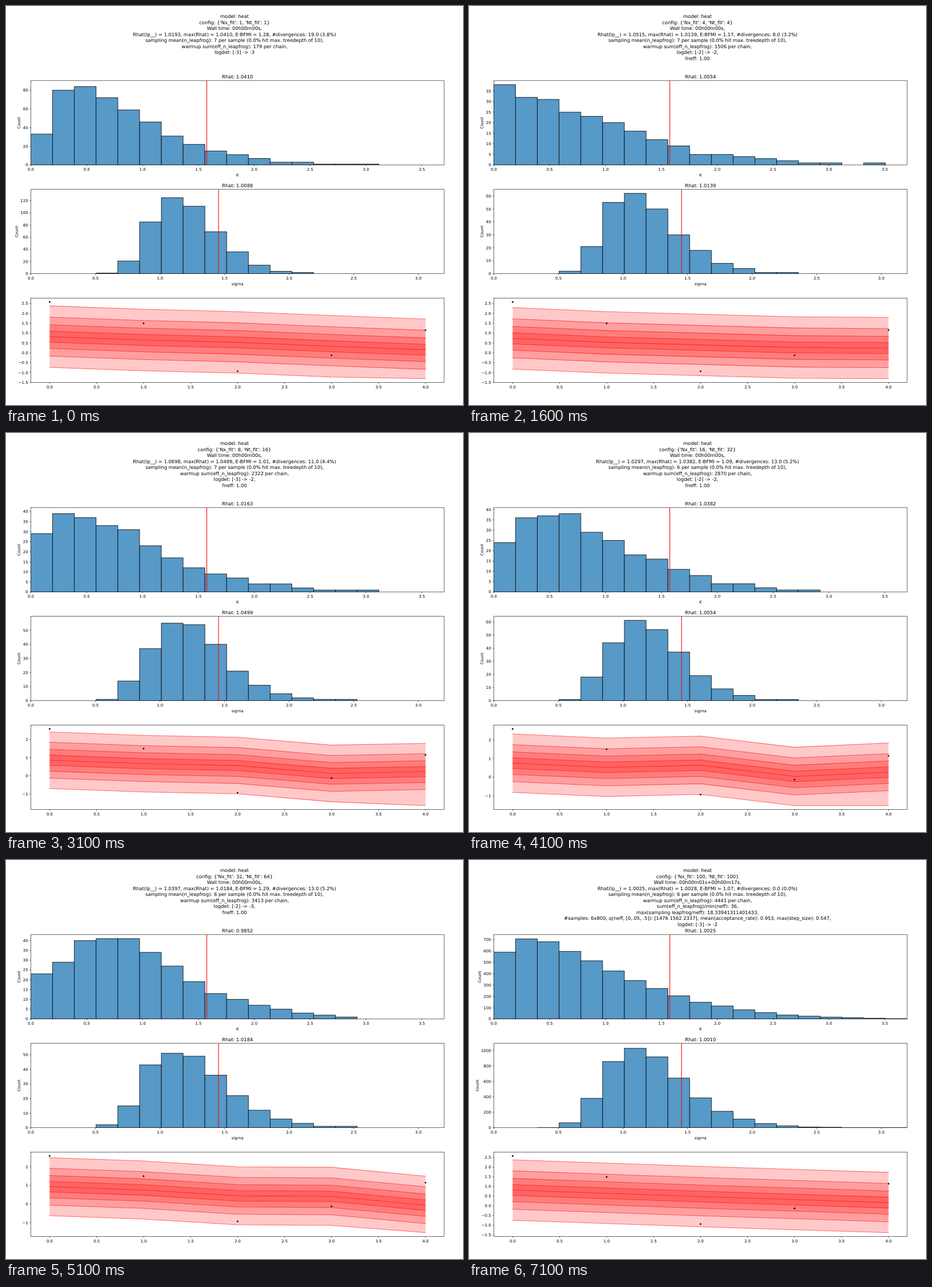
An HTML page with a canvas that plays this animation: 800x700 px, repeating every 7600 ms.

```html
<!DOCTYPE html>
<html lang="en">
<head>
<meta charset="utf-8">
<title>Posterior fit</title>
<style>
html, body { margin: 0; width: 100%; height: 100%; overflow: hidden; background: #fff; }
canvas { display: block; }
</style>
</head>
<body>
<canvas id="stage" width="800" height="700"></canvas>
<script>
const ctx = document.getElementById('stage').getContext('2d');
const LEFT = 43.5, RIGHT = 767, HEIGHT = 148, BINS = 19;
const TOP_K = 130.9, TOP_SIGMA = 321.7, TOP_FIT = 512.5;
const SMALL = 6.944, LARGE = 8.333;
const FIRST_MS = 100, STEP_MS = 500, LOOP_MS = 7600;
const LAST = 15, SHORT_RUN = 250;

const SIZES = [1, 2, 4, 8, 16, 32, 64, 100];
const OBSERVED = [2.58, 1.495, -0.935, -0.127, 1.145];
// Distance of the nested quantile curves from the median, widest first.
const QUANTILES = [1.56, 0.99, 0.6, 0.28];
// Lower end of the widest band in each step; it sets the axis.
const LOWEST = [-1.31, -1.56, -1.56, -1.415, -1.31, -1.47, -1.75, -1.65,
  -1.57, -1.52, -1.415, -1.54, -1.4, -1.4, -1.415, -1.38];

// Key runs. peaks: first K bin, highest K bin, highest sigma bin.
// k and sigma: position of the mode and width, in bins. median: at x = 0..4.
const runs = [
  { at: 0, samples: 500, lp: 1.0193, rk: 1.0410, rs: 1.0088, bfmi: 1.28, div: 3.8, leap: 7, warm: 179,
    det: -3, end: -3, peaks: [33, 86, 132], k: [1.5, 4.6], sigma: [6.7, 0.21], median: [0.82, 0.65, 0.53, 0.33, 0.155] },
  { at: 4, samples: 250, lp: 1.0515, rk: 1.0054, rs: 1.0139, bfmi: 1.17, div: 3.2, leap: 7, warm: 1506,
    det: -2, end: -2, peaks: [38, 36, 62], k: [0, 6.5], sigma: [6.4, 0.25], median: [0.735, 0.53, 0.4, 0.27, 0.24] },
  { at: 6, samples: 250, lp: 1.0898, rk: 1.0054, rs: 1.0721, bfmi: 0.97, div: 4, leap: 7, warm: 2048,
    det: -3, end: -2, peaks: [31, 41, 55], k: [1, 5.4], sigma: [6.9, 0.24], median: [0.91, 0.735, 0.525, 0.17, 0.205] },
  { at: 9, samples: 250, lp: 1.0297, rk: 1.0382, rs: 1.0054, bfmi: 1.09, div: 5.2, leap: 6, warm: 2870,
    det: -2, end: -2, peaks: [24, 39, 61], k: [2, 5], sigma: [6.6, 0.24], median: [0.75, 0.53, 0.64, 0.04, 0.27] },
  { at: 11, samples: 250, lp: 1.0397, rk: 0.9852, rs: 1.0184, bfmi: 1.29, div: 5.2, leap: 6, warm: 3413,
    det: -2, end: -3, peaks: [23, 41, 55], k: [3, 4.8], sigma: [6.7, 0.25], median: [0.93, 0.75, 0.44, 0.41, -0.065] },
  { at: 13, samples: 250, lp: 1.0033, rk: 0.9964, rs: 1.0154, bfmi: 1.37, div: 4.8, leap: 6, warm: 3946,
    det: -3, end: -3, peaks: [4, 47, 54], k: [3, 4.2], sigma: [6.5, 0.24], median: [0.81, 0.635, 0.395, 0.47, 0.13] },
  { at: 15, samples: 4800, lp: 1.0025, rk: 1.0025, rs: 1.0010, bfmi: 1.07, div: 0, leap: 6, warm: 4441,
    det: -3, end: -2, peaks: [590, 710, 1040], k: [1, 6.1], sigma: [6.53, 0.265], median: [0.82, 0.65, 0.48, 0.33, 0.17] }
];

const mix = (a, b, u) => {
  if (Array.isArray(a)) return a.map((v, i) => mix(v, b[i], u));
  if (typeof a === 'number') return a + (b - a) * u;
  return Object.fromEntries(Object.keys(a).map(name => [name, mix(a[name], b[name], u)]));
};

const shorten = run => ({
  ...run, samples: SHORT_RUN, peaks: run.peaks.map(c => c * SHORT_RUN / run.samples)
});

// Steps between two key runs blend their neighbours.
function runAt(index) {
  const next = runs.findIndex(r => r.at >= index), b = runs[next];
  if (b.at === index) return b;
  const a = runs[next - 1];
  const run = mix(shorten(a), shorten(b), (index - a.at) / (b.at - a.at));
  run.div = Math.round(run.div / 0.4) * 0.4;
  run.peaks = run.peaks.map(Math.round);
  return run;
}

function random(seed) {
  const v = Math.sin(seed * 12.9898) * 43758.5453;
  return v - Math.floor(v);
}

// Bin counts with a sampling wobble that grows with the square root of the count.
const sampled = (peak, seed, shape) => Array.from({ length: BINS }, (_, i) => {
  const mean = peak * shape(i);
  const count = mean + (random(seed + i) - 0.5) * Math.sqrt(mean);
  return Math.round(Math.min(peak, Math.max(0, count)));
});

function countsK({ at, peaks: [first, peak], k: [mode, width] }) {
  const counts = sampled(peak, at * 40 + 1, i => Math.exp(-((Math.abs(i - mode) / width) ** 1.6)));
  counts[0] = first;
  return counts;
}

function countsSigma({ at, peaks, sigma: [mode, spread] }) {
  return sampled(peaks[2], at * 40 + 21, i => Math.exp(-((Math.log((i + 0.5) / mode) / spread) ** 2) / 2));
}

function text(str, x, y, size = SMALL, align = 'center') {
  ctx.font = `${size}px "DejaVu Sans", sans-serif`;
  ctx.textAlign = align;
  ctx.fillStyle = '#000';
  ctx.fillText(str, x, y);
}

function line(points, color, width) {
  ctx.beginPath();
  points.forEach(([x, y]) => ctx.lineTo(x, y));
  ctx.strokeStyle = color;
  ctx.lineWidth = width;
  ctx.stroke();
}

function niceStep(range) {
  const raw = range / 9, unit = 10 ** Math.floor(Math.log10(raw));
  return [1, 2, 2.5, 5, 10].find(m => m * unit >= raw - 1e-9) * unit;
}

function frame(top) {
  ctx.strokeStyle = '#000';
  ctx.lineWidth = 0.6;
  ctx.strokeRect(LEFT, top, RIGHT - LEFT, HEIGHT);
}

function tickX(x, top, value) {
  const y = top + HEIGHT;
  line([[x, y], [x, y + 2.4]], '#000', 0.6);
  text(value.toFixed(1), x, y + 10.1);
}

function tickY(y, label) {
  line([[LEFT - 2.4, y], [LEFT, y]], '#000', 0.6);
  text(label, LEFT - 4.9, y + 2.5, SMALL, 'right');
}

function histogram(top, counts, highest, span, truth, name, rhat) {
  const bottom = top + HEIGHT, limit = highest * 1.05;
  const yOf = c => bottom - c / limit * HEIGHT;
  const xOf = v => LEFT + v / span * (RIGHT - LEFT);
  const binWidth = (RIGHT - LEFT) / BINS;

  ctx.save();
  ctx.beginPath();
  ctx.rect(LEFT, top, RIGHT - LEFT, HEIGHT);
  ctx.clip();
  counts.forEach((count, i) => {
    if (!count) return;
    const box = [LEFT + i * binWidth, yOf(count), binWidth, bottom - yOf(count)];
    ctx.fillStyle = 'rgb(87,153,199)';
    ctx.fillRect(...box);
    ctx.strokeStyle = '#000';
    ctx.lineWidth = 0.8;
    ctx.strokeRect(...box);
  });
  line([[xOf(truth), top], [xOf(truth), bottom]], '#f00', 1.1);
  ctx.restore();

  frame(top);
  for (let v = 0; v < span; v += 0.5) tickX(xOf(v), top, v);
  const step = niceStep(limit);
  let digits = 1;
  for (let c = 0; c <= limit; c += step) {
    tickY(yOf(c), String(c));
    digits = String(c).length;
  }
  text(name, (LEFT + RIGHT) / 2, bottom + 20.2);
  text('Rhat: ' + rhat.toFixed(4), (LEFT + RIGHT) / 2, top - 4.1, LARGE);

  ctx.save();
  ctx.translate(25.4 - (digits - 2) * 4.42, top + HEIGHT / 2);
  ctx.rotate(-Math.PI / 2);
  text('Count', 0, 0);
  ctx.restore();
}

function fit(median, lowest) {
  const margin = HEIGHT / 22, high = OBSERVED[0], range = high - lowest;
  const xOf = v => 76.4 + v * 164.5;
  const yOf = v => TOP_FIT + margin + (high - v) / range * (HEIGHT - 2 * margin);
  const curve = offset => median.map((m, i) => {
    const tail = i === 4 && offset === -QUANTILES[0];
    return [xOf(i), yOf(tail ? lowest : m + offset)];
  });
  const color = 'rgba(255,0,0,0.55)';

  ctx.save();
  ctx.lineCap = 'square';
  const bands = QUANTILES.map(q => [curve(q), curve(-q)]);
  for (const [upper, lower] of bands) {
    ctx.beginPath();
    [...upper, ...lower.slice().reverse()].forEach(([x, y]) => ctx.lineTo(x, y));
    ctx.fillStyle = 'rgba(255,0,0,0.21)';
    ctx.fill();
  }
  [...bands.flat(), curve(0)].forEach(points => line(points, color, 1.05));
  ctx.restore();

  ctx.fillStyle = '#000';
  OBSERVED.forEach((v, i) => {
    ctx.beginPath();
    ctx.arc(xOf(i), yOf(v), 1.4, 0, 2 * Math.PI);
    ctx.fill();
  });

  frame(TOP_FIT);
  for (let v = 0; v <= 4; v += 0.5) tickX(xOf(v), TOP_FIT, v);
  const step = niceStep(range * 1.1), low = lowest - range * 0.05;
  for (let v = Math.ceil(low / step) * step; v <= high + range * 0.05; v += step) {
    const label = Math.abs(v).toFixed(step < 1 ? 1 : 0);
    tickY(yOf(v), (v < 0 ? '\u2212' : '') + label);
  }
}

function header(run, index) {
  const final = index === LAST;
  const nx = SIZES[index >> 1], nt = SIZES[Math.min((index + 1) >> 1, SIZES.length - 1)];
  const maxRhat = final ? 1.0028 : Math.max(run.rk, run.rs);
  const divergences = (run.div * run.samples / 100).toFixed(1);
  const logdet = `logdet: [${Math.round(run.det)}] -> ${Math.round(run.end)}`;
  const lines = [
    'model: heat',
    `config: {'Nx_fit': ${nx}, 'Nt_fit': ${nt}}`,
    `Wall time: ${final ? '00h00m01s+00h00m17s' : '00h00m00s'},`,
    `Rhat(lp__) = ${run.lp.toFixed(4)}, max(Rhat) = ${maxRhat.toFixed(4)}, ` +
      `E-BFMI = ${run.bfmi.toFixed(2)}, #divergences: ${divergences} (${run.div.toFixed(1)}%)`,
    `sampling mean(n_leapfrog): ${Math.round(run.leap)} per sample (0.0% hit max. treedepth of 10),`,
    `warmup sum(eff_n_leapfrog): ${Math.round(run.warm)} per chain,`
  ];
  if (final) {
    lines.push('sum(eff_n_leapfrog)/min(neff): 36,',
      'max(sampling leapfrog/neff): 18.33941311401433,',
      '#samples: 6x800, q(neff, [0,.05, .5]): [1476 1562 2337], ' +
        'mean(acceptance_rate): 0.953, max(step_size): 0.547,',
      logdet);
  } else if (index === 0) {
    lines.push(logdet);
  } else {
    lines.push(logdet + ',', 'fneff: 1.00');
  }
  lines.forEach((str, i) => text(str, 400, 21 + i * 10.5, LARGE));
}

function draw(index) {
  const run = runAt(index), [first, peakK, peakSigma] = run.peaks;
  ctx.fillStyle = '#fff';
  ctx.fillRect(0, 0, 800, 700);
  header(run, index);
  histogram(TOP_K, countsK(run), Math.max(first, peakK), 3.7, 1.575, 'K', run.rk);
  histogram(TOP_SIGMA, countsSigma(run), peakSigma, 3.2, 1.453, 'sigma', run.rs);
  fit(run.median, LOWEST[index]);
}

ctx.textRendering = 'geometricPrecision';
const start = performance.now();
function tick() {
  const t = Math.max(0, performance.now() - start) % LOOP_MS;
  draw(t < FIRST_MS ? 0 : 1 + Math.floor((t - FIRST_MS) / STEP_MS));
  requestAnimationFrame(tick);
}
tick();
</script>
</body>
</html>
```
